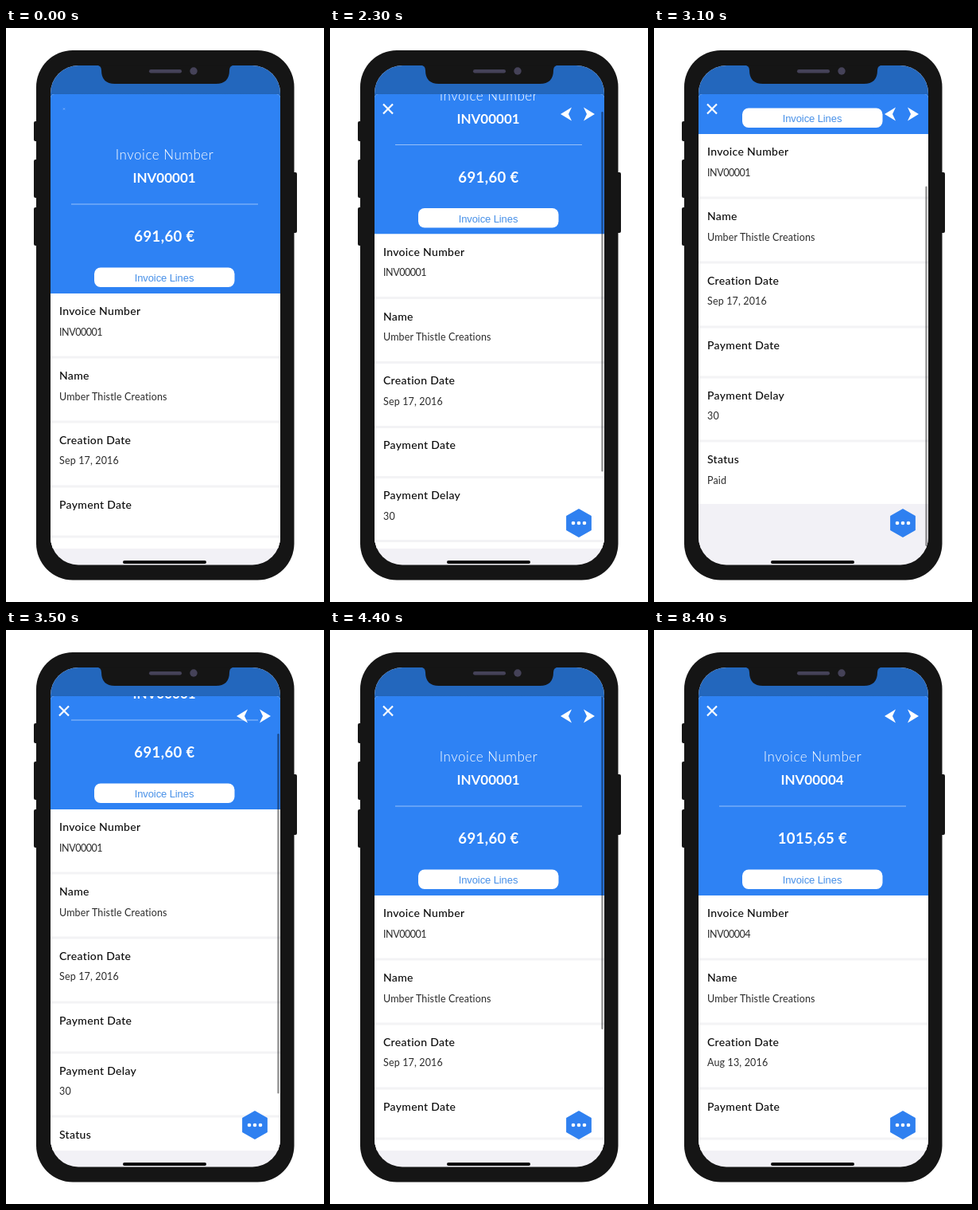
An HTML page that plays this animation: 400x720 px, repeating every 9 s.

```html
<!DOCTYPE html>
<html lang="en">
<head>
<meta charset="utf-8">
<title>Invoice screen</title>
<style>
  html, body { margin: 0; width: 100%; height: 100%; overflow: hidden; background: #fff; }
  svg { display: block; width: 400px; height: 720px; }
  text { font-family: Lato, "Open Sans", sans-serif; }
  .mid { text-anchor: middle; fill: #fff; }
  .caption { font-size: 17px; font-weight: 300; letter-spacing: .5px; }
  .number { font-size: 17px; font-weight: 700; }
  .amount { font-size: 18.5px; font-weight: 700; letter-spacing: .4px; }
  .button { font: 13px "Liberation Sans", Arial, sans-serif; letter-spacing: -.1px; fill: #4790e8; }
  .title { font-size: 14px; font-weight: 500; letter-spacing: .32px; fill: #0c0c0c; }
  .value { font-size: 12.5px; letter-spacing: .15px; fill: #2c2c2c; }
  .code { letter-spacing: -.45px; }
</style>
</head>
<body>
<svg viewBox="0 0 400 720">
  <defs>
    <clipPath id="screen"><rect x="56" y="47" width="289" height="626.5" rx="35"/></clipPath>
    <clipPath id="sheet"><path d="M56 653V88q0-5 5-5H340q5 0 5 5V653z"/></clipPath>
    <linearGradient id="top" x2="0" y2="1">
      <stop offset=".8" stop-color="#2367bd"/>
      <stop offset="1" stop-color="#205fae"/>
    </linearGradient>
  </defs>

  <g fill="#151515">
    <rect x="35" y="117" width="8" height="25" rx="2"/>
    <rect x="35" y="165" width="8" height="48" rx="2"/>
    <rect x="35" y="225" width="8" height="48" rx="2"/>
    <rect x="357" y="181" width="9" height="76" rx="2"/>
    <rect x="38" y="28" width="324.500" height="664.500" rx="46"/>
  </g>

  <g clip-path="url(#screen)">
    <rect x="56" y="47" width="289" height="627" fill="#f2f1f6"/>
    <rect x="56" y="47" width="289" height="42" fill="url(#top)"/>
    <g clip-path="url(#sheet)">
      <rect x="56" y="83" width="289" height="570" fill="#f2f1f6"/>
      <g id="content">
        <rect x="56" y="-20" width="289" height="353" fill="#2e82f4"/>
        <text class="mid caption" x="199.500" y="165">Invoice Number</text>
        <text class="mid number" id="number" x="199" y="194"></text>
        <path d="M82 221H317" stroke="#fff" stroke-opacity=".5"/>
        <text class="mid amount" id="amount" x="199.500" y="268"></text>
        <rect x="111" y="300.500" width="176.500" height="24.500" rx="8" fill="#fff"/>
        <text class="mid button" x="199" y="318">Invoice Lines</text>
        <rect x="56" y="333" width="289" height="464" fill="#fff"/>
        <g id="rows"></g>
      </g>
      <rect id="bar" x="341.300" width="2.400" rx="1.200"/>
    </g>
    <g id="close"><path d="M-6-6L6 6M6-6L-6 6" stroke="#fff" stroke-width="2.200"/></g>
    <g id="prev"><path d="M-7 0L7-8.500L3 0L7 8.500z" fill="#fff"/></g>
    <g id="next"><path d="M7 0L-7-8.500L-3 0L-7 8.500z" fill="#fff"/></g>
    <g id="menu">
      <path d="M0-17L15-8.500V8.500L0 17L-15 8.500V-8.500z" fill="#2f80f0" stroke="#2f80f0" stroke-width="1.800" stroke-linejoin="round"/>
      <g fill="#fff"><circle cx="-7" r="2.300"/><circle r="2.300"/><circle cx="7" r="2.300"/></g>
    </g>
    <rect x="147" y="668" width="105" height="4" rx="2" fill="#080808"/>
  </g>

  <path d="M113 46.500Q120 46.500 120 53Q120 70 137 70H264Q281 70 281 53Q281 46.500 288 46.500z" fill="#151515"/>
  <rect x="180" y="52" width="41" height="4.400" rx="2.200" fill="#454258"/>
  <circle cx="236" cy="54" r="4.700" fill="#454258"/>
</svg>
<script>
const LOOP = 9000, STEP = 100;
const $ = id => document.getElementById(id);

// title, baseline, value, value id, divider below
const rows = [
  ['Invoice Number', 360, '', 'code', 413],
  ['Name', 441, 'Umber Thistle Creations', 'name', 494],
  ['Creation Date', 521.5, '', 'date', 575],
  ['Payment Date', 602.5, '', 'paid', 638],
  ['Payment Delay', 665.5, '30', 'delay', 718],
  ['Status', 746, 'Paid', 'status', 0]
];
$('rows').innerHTML = rows.map(([title, y, value, id, line]) =>
  `<text class="title" x="67" y="${y}">${title}</text>
   <text class="value ${id}" id="${id}" x="67" y="${y + 25.7}">${value}</text>` +
  (line ? `<rect x="56" y="${line - 1.5}" width="289" height="3" fill="#f3f3f5"/>` : '')
).join('');

// start time, number, amount, date
const invoices = [
  [0, 'INV00001', '691,60 €', 'Sep 17, 2016'],
  [5000, 'INV00002', '1284,30 €', 'Sep 10, 2016'],
  [5500, 'INV00003', '1027,50 €', 'Aug 28, 2016'],
  [6200, 'INV00004', '1015,65 €', 'Aug 13, 2016']
];

const scrollKeys = [
  [2000, 0], [2100, 10], [2200, 38], [2300, 74.5], [2400, 115], [2500, 156],
  [2600, 190], [2700, 211], [2800, 214], [3000, 205], [3100, 200], [3200, 186],
  [3350, 152], [3500, 108], [3650, 64], [3800, 29], [4000, 7], [4200, 2], [4400, 0]
];
const fadeKeys = [[2000, 0], [2200, 1], [4500, 1], [4800, 0]];

// id, centre x, centre y, delay, frequency, damping
const icons = [
  ['close', 73, 101.5, -50, 7, 2.3],
  ['prev', 297, 108, 400, 5.2, 2.2],
  ['next', 326, 108, 400, 5.2, 2.2],
  ['menu', 313, 621, 400, 5.2, 2.5]
];

function track(keys, t) {
  const i = keys.findIndex(k => k[0] > t);
  if (i < 0) return keys[keys.length - 1][1];
  if (i === 0) return keys[0][1];
  const [t0, a] = keys[i - 1], [t1, b] = keys[i];
  return a + (b - a) * (t - t0) / (t1 - t0);
}

function spring(ms, freq, damp) {
  const s = ms / 1000;
  return s <= 0 ? 0 : 1 - Math.exp(-damp * s) * Math.cos(freq * s);
}

function draw(t) {
  const offset = track(scrollKeys, t);
  $('content').setAttribute('transform', `translate(0 ${-offset})`);

  const top = 49.5 + 0.745 * offset + Math.max(0, offset - 203) * 0.4;
  const bottom = Math.min(651.5, 501 + 0.745 * offset);
  $('bar').setAttribute('y', top);
  $('bar').setAttribute('height', bottom - top);
  $('bar').setAttribute('fill-opacity', 0.42 * track(fadeKeys, t));

  for (const [id, x, y, delay, freq, damp] of icons) {
    const size = t >= 2100 ? 1 : spring(t - delay, freq, damp);
    $(id).setAttribute('transform', `translate(${x} ${y}) scale(${size})`);
  }

  const [, number, amount, date] = invoices.filter(v => v[0] <= t).pop();
  $('number').textContent = $('code').textContent = number;
  $('amount').textContent = amount;
  $('date').textContent = date;
}

const start = performance.now();
function tick() {
  const t = (performance.now() - start + 8) % LOOP;
  draw(Math.floor(t / STEP) * STEP);
  requestAnimationFrame(tick);
}
tick();
</script>
</body>
</html>
```
